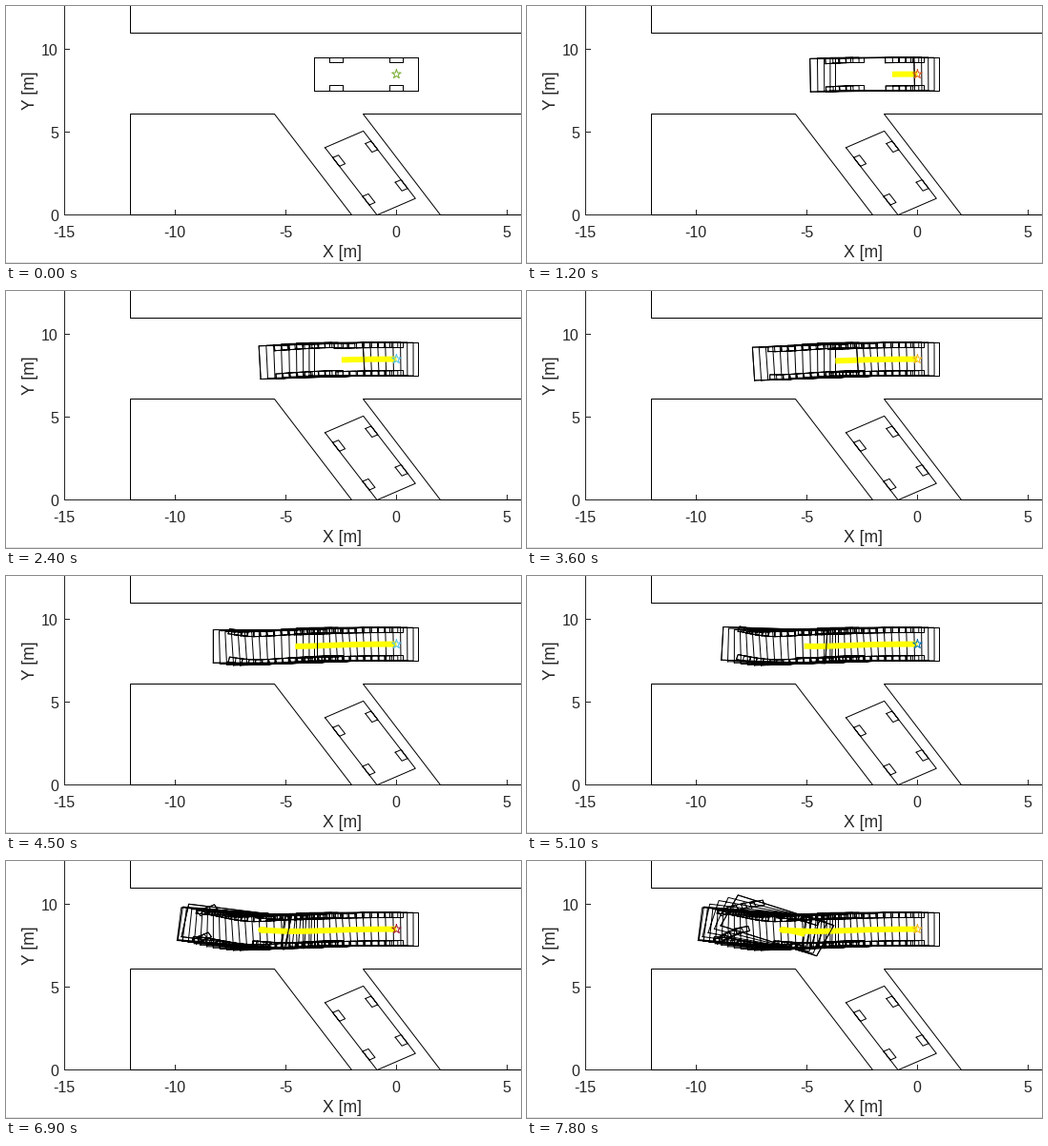
Write a matplotlib script that moves like this. It is 540 by 270 pixels and loops after 8000 ms.

```python
import numpy as np
import matplotlib.pyplot as plt
from matplotlib.animation import FuncAnimation

plt.rcParams["path.simplify"] = False
plt.rcParams["font.family"] = "Liberation Sans"

W, H, DPI = 540, 270, 100
PT = 72 / DPI                      # points per pixel
INK, AXIS = "black", "#262626"
STAR_COLORS = ["#0072BD", "#D95319", "#EDB120", "#7E2F8E",
               "#77AC30", "#4DBEEE", "#A2142F"]

WHEELBASE, OVERHANG, HALF_WIDTH = 2.7, 1.0, 1.0
WHEEL_LENGTH, WHEEL_WIDTH = 0.6, 0.3

TICKS_PER_STEP = 3                 # 100 ms ticks, one pose every 300 ms
STEPS = 27
SWING, TURN = 11, 21               # steps where the heading peaks, where reversing starts
REVERSE_CURVATURE = 0.282


def to_px(points, snap=False):
    """Metres to stage pixels, optionally snapped to pixel centres."""
    px = np.asarray(points, float) * [23.22, -17.4] + [409.4, 219.5]
    return np.floor(px) + 0.5 if snap else px


def rotate(points, angle):
    c, s = np.cos(angle), np.sin(angle)
    return np.asarray(points) @ np.array([[c, s], [-s, c]])


def box(center, length, width):
    corners = np.array([(-1, -1), (1, -1), (1, 1), (-1, 1), (-1, -1)])
    return corners * [length / 2, width / 2] + center


def car_outline(x, y, theta, steer=0.0):
    """Body and four wheels as one nan-separated path; the car faces -x."""
    gap = [[np.nan, np.nan]]
    wheel = box((0, 0), WHEEL_LENGTH, WHEEL_WIDTH)
    side = HALF_WIDTH - WHEEL_WIDTH / 2
    parts = [box((-WHEELBASE / 2, 0), WHEELBASE + 2 * OVERHANG, 2 * HALF_WIDTH)]
    for axle, turn in ((0, 0), (-WHEELBASE, steer)):
        for dy in (-side, side):
            parts.append(rotate(wheel, turn) + [axle, dy])
    path = np.vstack([np.vstack([part, gap]) for part in parts])
    return to_px(rotate(path, theta) + [x, y], snap=theta == 0)


def ease(start, end, n):
    u = np.clip((n - start) / (end - start), 0, 1)
    return u * u * (3 - 2 * u)


def travel(n):
    """Signed distance driven in step n: speed up, slow down, then reverse."""
    if n <= TURN:
        return min(0.21 + 0.03 * n, 0.373 - 0.0061 * n)
    return -min(0.14 * (n - TURN) - 0.09, 0.28)


def drive():
    """Pose and front wheel angle for each step, integrated from the start."""
    x, y, theta, steer = 0.0, 8.5, 0.0, 0.0
    poses = [(x, y, theta, steer)]
    for n in range(1, STEPS):
        ds = travel(n)
        if n <= TURN:
            heading = 0.052 * ease(0, SWING, n) - 0.147 * ease(SWING, TURN, n)
        else:
            heading = theta + REVERSE_CURVATURE * ds
        middle = (theta + heading) / 2
        x -= ds * np.cos(middle)
        y -= ds * np.sin(middle)
        steer = np.arctan(WHEELBASE * (heading - theta) / ds)
        theta = heading
        poses.append((x, y, theta, steer))
    return np.array(poses)


def line(points=((np.nan, np.nan),), color=INK, width=1, z=2, **style):
    xs, ys = np.asarray(points, float).T
    return ax.plot(xs, ys, color=color, lw=width * PT, zorder=z,
                   snap=False, **style)[0]


def label(x, y, text, size=16, **style):
    ax.text(x, y, text, fontsize=size * PT, color=AXIS,
            **{"ha": "center", "va": "center_baseline", **style})


fig = plt.figure(figsize=(W / DPI, H / DPI), dpi=DPI, facecolor="white")
ax = fig.add_axes([0, 0, 1, 1])
ax.set(xlim=(0, W), ylim=(H, 0))
ax.axis("off")

# Axes
left, bottom = to_px((-15, 0), snap=True)
line([(left, -2), (left, bottom), (W + 2, bottom)], AXIS)
line([(0, H - 0.5), (W, H - 0.5)], "#e0e0e0")
for value in range(-15, 6, 5):
    tx = to_px((value, 0), snap=True)[0]
    line([(tx, bottom), (tx, bottom - 5)], AXIS)
    label(tx - 0.5, 237, str(value))
for value in range(0, 11, 5):
    ty = to_px((0, value), snap=True)[1]
    line([(left, ty), (left + 5, ty)], AXIS)
    label(left - 6.7, ty + 0.5, str(value), ha="right")
label(352, 258, "X [m]", 17.6)
label(25.8, 89, "Y [m]", 17.6, rotation=90, va="center")

# Road walls and the parking goal
for wall in ([(-12, 14), (-12, 11), (7, 11)],
             [(-12, 0), (-12, 6.1), (-5.5, 6.1), (-2, 0), (-12, 0)],
             [(7, 6.1), (-1.5, 6.1), (2, 0), (7, 0)]):
    line(to_px(wall, snap=True))
goal_angle = -np.pi / 3
goal = np.array([-1.185, 2.53]) + rotate([WHEELBASE / 2, 0], goal_angle)
line(car_outline(*goal, goal_angle))

# Moving parts
poses = drive()
outlines = [car_outline(*pose) for pose in poses]
track = to_px(poses[:, :2])
trail = line(z=3)
path = line(color="#ffff00", width=6, z=4,
            solid_capstyle="butt", solid_joinstyle="round")
car = line(z=5)

spokes = np.arange(11)
radius = np.where(spokes % 2, 0.382, 1) * 5
angle = spokes * np.pi / 5 - np.pi / 2
star = line(track[0] + np.column_stack([radius * np.cos(angle),
                                        radius * np.sin(angle)]), z=6)


def update(tick):
    step = min(tick // TICKS_PER_STEP, STEPS - 1)
    trail.set_data(*np.vstack(outlines[:step + 1]).T)
    path.set_data(*track[:step + 1].T)
    car.set_data(*outlines[step].T)
    star.set_color(STAR_COLORS[(step + 4) % len(STAR_COLORS)])
    return trail, path, car, star


anim = FuncAnimation(fig, update, frames=80, interval=100,
                     repeat=True, repeat_delay=0)
plt.show()
```
